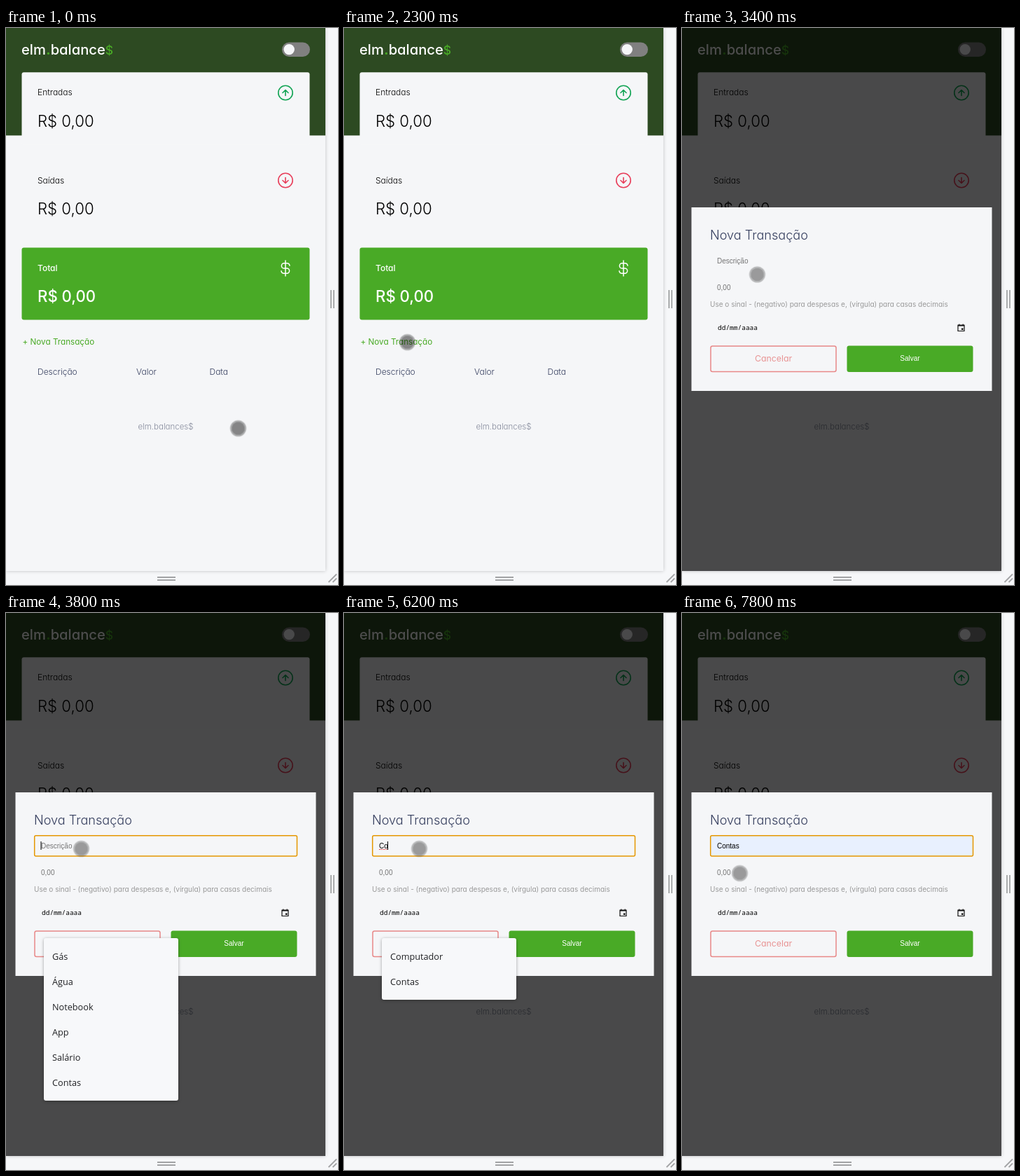
An HTML page that plays this animation: 474 by 795 pixels, repeating every 8 s.

```html
<!DOCTYPE html>
<html lang="pt-BR">
<head>
<meta charset="utf-8">
<title>Nova Transação</title>
<style>
  html, body { margin: 0; width: 100%; height: 100%; overflow: hidden; background: #f6f7f9; }
  svg { display: block; width: 474px; height: 795px; }
  text { white-space: pre; }

  .ui { font: 300 12px Inter, "Open Sans", sans-serif; font-feature-settings: "cv11"; }
  .money { font-size: 22.2px; font-weight: 350; }
  .logo { font-size: 20.2px; font-weight: 500; fill: #fff; }
  .field { font: 10px "Liberation Sans", Arial, sans-serif; }
  .menu { font: 500 12.7px "Open Sans", "Noto Sans", sans-serif; fill: #202124; }
  .paper { fill: #f5f6f8; }
  .green { fill: #49aa26; }
  .line { fill: none; stroke-linecap: round; stroke-linejoin: round; }
  .list { fill: #f7f8fa; filter: drop-shadow(0 1px 2px rgba(0, 0, 0, .35)); }

  /* Timed parts: each name switches its element on and off */
  .timed { opacity: 0; animation: 8s step-end infinite; }
  .modal { animation-name: modal; }
  .tap { animation-name: tap; }
  .status { animation-name: status; }
  .focus { animation-name: focus; }
  .hint { animation-name: hint; }
  .all { animation-name: all; }
  .some { animation-name: some; }
  .typed1 { animation-name: typed1; }
  .typed2 { animation-name: typed2; }
  .spell { animation-name: spell; }
  .pick1 { animation-name: pick1; }
  .pick2 { animation-name: pick2; }
  .filled { animation-name: filled; }
  .chosen { animation-name: chosen; }
  .caret0 { animation-name: caret0; }
  .caret2 { animation-name: caret2; }
  .caret3 { animation-name: caret3; }

  @keyframes modal  { 0% { opacity: 0 } 33.75% { opacity: 1 } 100% { opacity: 1 } }
  @keyframes tap    { 0%, 35% { opacity: 0 } 33.75% { opacity: 1 } }
  @keyframes status { 0%, 37.5% { opacity: 0 } 33.75% { opacity: 1 } }
  @keyframes focus  { 0% { opacity: 0 } 47.5% { opacity: 1 } 100% { opacity: 1 } }
  @keyframes hint   { 0% { opacity: 1 } 60% { opacity: 0 } 100% { opacity: 0 } }
  @keyframes all    { 0%, 61.25% { opacity: 0 } 47.5% { opacity: 1 } }
  @keyframes some   { 0%, 87.5% { opacity: 0 } 61.25% { opacity: 1 } }
  @keyframes typed1 { 0%, 63.75% { opacity: 0 } 60% { opacity: 1 } }
  @keyframes typed2 { 0%, 80% { opacity: 0 } 63.75% { opacity: 1 } }
  @keyframes spell  { 0%, 80% { opacity: 0 } 77.5% { opacity: 1 } }
  @keyframes pick1  { 0%, 81.25% { opacity: 0 } 80% { opacity: 1 } }
  @keyframes pick2  { 0%, 87.5% { opacity: 0 } 81.25% { opacity: 1 } }
  @keyframes filled { 0% { opacity: 0 } 80% { opacity: 1 } 100% { opacity: 1 } }
  @keyframes chosen { 0% { opacity: 0 } 81.25% { opacity: 1 } 100% { opacity: 1 } }
  @keyframes caret0 { 0%, 53.75% { opacity: 0 } 47.5% { opacity: 1 } }
  @keyframes caret2 { 0%, 70%, 80% { opacity: 0 } 63.75%, 76.25% { opacity: 1 } }
  @keyframes caret3 { 0%, 93.75% { opacity: 0 } 87.5% { opacity: 1 } }

  .pointer { animation: move 8s step-end infinite, tone 8s step-end infinite; }
  @keyframes move {
    0%     { transform: translate(331.5px, 571.5px) }
    8.75%  { transform: translate(331.5px, 571.5px); animation-timing-function: steps(4) }
    13.75% { transform: translate(205px, 402px) }
    15%    { transform: translate(205px, 402px); animation-timing-function: steps(2) }
    17.5%  { transform: translate(168.5px, 360.5px); animation-timing-function: steps(7) }
    26.25% { transform: translate(94.5px, 446px); animation-timing-function: steps(2) }
    28.75% { transform: translate(90.5px, 448.5px) }
    36.25% { transform: translate(90.5px, 448.5px); animation-timing-function: steps(3) }
    40%    { transform: translate(107.5px, 359.5px) }
    41.25% { transform: translate(107.5px, 359.5px); animation-timing-function: steps(3) }
    45%    { transform: translate(107.5px, 336.5px) }
    92.5%  { transform: translate(107.5px, 336.5px); animation-timing-function: steps(4) }
    97.5%  { transform: translate(82.5px, 371.5px) }
    100%   { transform: translate(82.5px, 371.5px) }
  }
  @keyframes tone { 0% { opacity: 1 } 37.5% { opacity: .82 } 100% { opacity: .82 } }
</style>
</head>
<body>
<svg viewBox="0 0 474 795" xmlns="http://www.w3.org/2000/svg">
  <!-- Window frame and resize handles -->
  <rect width="474" height="795" fill="#f6f7f9"/>
  <rect class="paper" width="456" height="775" style="filter: drop-shadow(0 0 2.5px rgba(0, 0, 0, .22))"/>
  <path d="M464 374v26M468 374v26M216 784h26M216 788h26M460.5 791l11.5-11.5M466.5 791l5.5-5.5" fill="none" stroke="#a2a3a5" stroke-width="1.8"/>

  <g class="ui">
    <rect width="456" height="153.4" fill="#2d4a22"/>
    <text class="logo" x="22" y="38">elm<tspan class="green" font-weight="700">.</tspan>balance<tspan class="green" font-size="17.5">$</tspan></text>
    <rect x="394" y="20.5" width="40" height="20.5" rx="10.25" fill="#808080"/>
    <circle class="paper" cx="404.2" cy="30.6" r="7.7"/>

    <rect class="paper" x="22.5" y="63.2" width="411" height="103" rx="3"/>
    <text x="45" y="96">Entradas</text>
    <text class="money" x="45" y="141">R$ 0,00</text>
    <g class="line" stroke="#12a454" stroke-width="1.6" transform="translate(399 92.5)">
      <circle r="10.2"/><path d="M0 4V-4M-4 0L0-4L4 0"/>
    </g>

    <text x="45" y="222">Saídas</text>
    <text class="money" x="45" y="266">R$ 0,00</text>
    <g class="line" stroke="#e83f5b" stroke-width="1.6" transform="translate(399 217.5)">
      <circle r="10.2"/><path d="M0-4V4M-4 0L0 4L4 0"/>
    </g>

    <rect class="green" x="22.5" y="313.6" width="411" height="102.9" rx="3"/>
    <g fill="#fff">
      <text x="45" y="347" font-weight="500">Total</text>
      <text class="money" x="45" y="391" style="font-weight: 450">R$ 0,00</text>
    </g>
    <path class="line" transform="translate(387 331)" stroke="#fff" stroke-width="1.5" d="M12 1v22M18 8.2a4 4 0 0 0-4-3.4h-4a3.6 3.6 0 0 0 0 7.2h4a3.6 3.6 0 0 1 0 7.2h-4a4 4 0 0 1-4-3.4"/>

    <text class="green" x="23.5" y="452" font-weight="400" style="font-size: 11.7px">+ Nova Transação</text>
    <g fill="#363f5f">
      <text x="45" y="495">Descrição</text>
      <text x="186" y="495">Valor</text>
      <text x="290.5" y="495">Data</text>
    </g>
    <text x="228" y="573" text-anchor="middle" fill="#868b9c" style="font-size: 11.5px">elm.balances$</text>
  </g>

  <g class="timed modal">
    <rect width="456" height="775" opacity=".7"/>
    <rect x="13.5" y="256" width="429" height="262" fill="#f5f6f8"/>
    <g class="ui">
      <text x="40" y="302" fill="#363f5f" style="font-size: 18.1px">Nova Transação</text>
      <text x="40" y="398" fill="#999" style="font-size: 10px; font-weight: 400">Use o sinal - (negativo) para despesas e, (vírgula) para casas decimais</text>
      <rect x="41" y="454" width="179" height="36.5" rx="2.5" fill="none" stroke="#e88888" stroke-width="1.5"/>
      <text x="130.5" y="476" text-anchor="middle" fill="#e89494" font-weight="400" style="font-size: 12.3px">Cancelar</text>
    </g>
    <rect class="green" x="235.5" y="453.5" width="180" height="37.5" rx="3"/>

    <rect class="timed filled" x="41" y="318" width="374" height="29" fill="#e8f0fe"/>
    <rect class="timed focus" x="40.7" y="317.7" width="374.8" height="29.3" rx="2" fill="none" stroke="#e59700" stroke-width="1.5"/>

    <g class="field">
      <text x="325.5" y="475" text-anchor="middle" fill="#fff">Salvar</text>
      <text class="timed hint" x="50" y="336" fill="#757575">Descrição</text>
      <text x="50" y="374" fill="#757575">0,00</text>
      <text class="timed typed1" x="50" y="336">C</text>
      <text class="timed typed2" x="50" y="336">Co</text>
      <text class="timed pick1" x="50" y="336">Computador</text>
      <text class="timed chosen" x="50" y="336">Contas</text>
      <text x="51" y="431" style="font: 9.5px 'Noto Sans Mono', monospace">dd/mm/aaaa</text>
    </g>
    <path class="timed spell" d="M50 337.5H62" stroke="#e03030" stroke-dasharray="1.5 1"/>
    <rect class="timed caret0" x="49.5" y="326" width="1" height="12"/>
    <rect class="timed typed1" x="57" y="326" width="1" height="12"/>
    <rect class="timed caret2" x="62" y="326" width="1" height="12"/>
    <rect class="timed caret3" x="82" y="326" width="1" height="12"/>
    <path d="M394 424h9v8.5h-9zM394 425h9M395.8 424v-1.5M401.2 424v-1.5" fill="none" stroke="#111" stroke-width="1.2"/>
    <rect x="399" y="428.5" width="2.5" height="2.5" fill="#111"/>

    <rect class="timed tap" x="22.5" y="439" width="103.5" height="17.5" fill="#82cdf0" fill-opacity=".7"/>
    <g class="timed status">
      <path d="M0 754h147a3 3 0 0 1 3 3v18H0z"/>
      <text x="5" y="769" fill="#fff" style="font: 11.3px 'Open Sans', 'Noto Sans', sans-serif">Aguardando o cache...</text>
    </g>
  </g>

  <g class="menu">
    <g class="timed all">
      <rect class="list" x="54" y="464" width="192" height="232" rx="3"/>
      <text x="66" y="495">Gás</text>
      <text x="66" y="531">Água</text>
      <text x="66" y="567">Notebook</text>
      <text x="66" y="603">App</text>
      <text x="66" y="639">Salário</text>
      <text x="66" y="675">Contas</text>
    </g>
    <g class="timed some">
      <rect class="list" x="54" y="464" width="192" height="88" rx="3"/>
      <rect class="timed pick1" x="54" y="472" width="192" height="36" fill="#e4e5e7"/>
      <rect class="timed pick2" x="54" y="508" width="192" height="36" fill="#e4e5e7"/>
      <text x="66" y="495">Computador</text>
      <text x="66" y="531">Contas</text>
    </g>
  </g>

  <g class="pointer">
    <circle r="9.5" fill-opacity=".46"/>
    <circle r="10.5" fill="none" stroke="#505050" stroke-width="2" stroke-opacity=".45"/>
  </g>
</svg>
</body>
</html>
```
